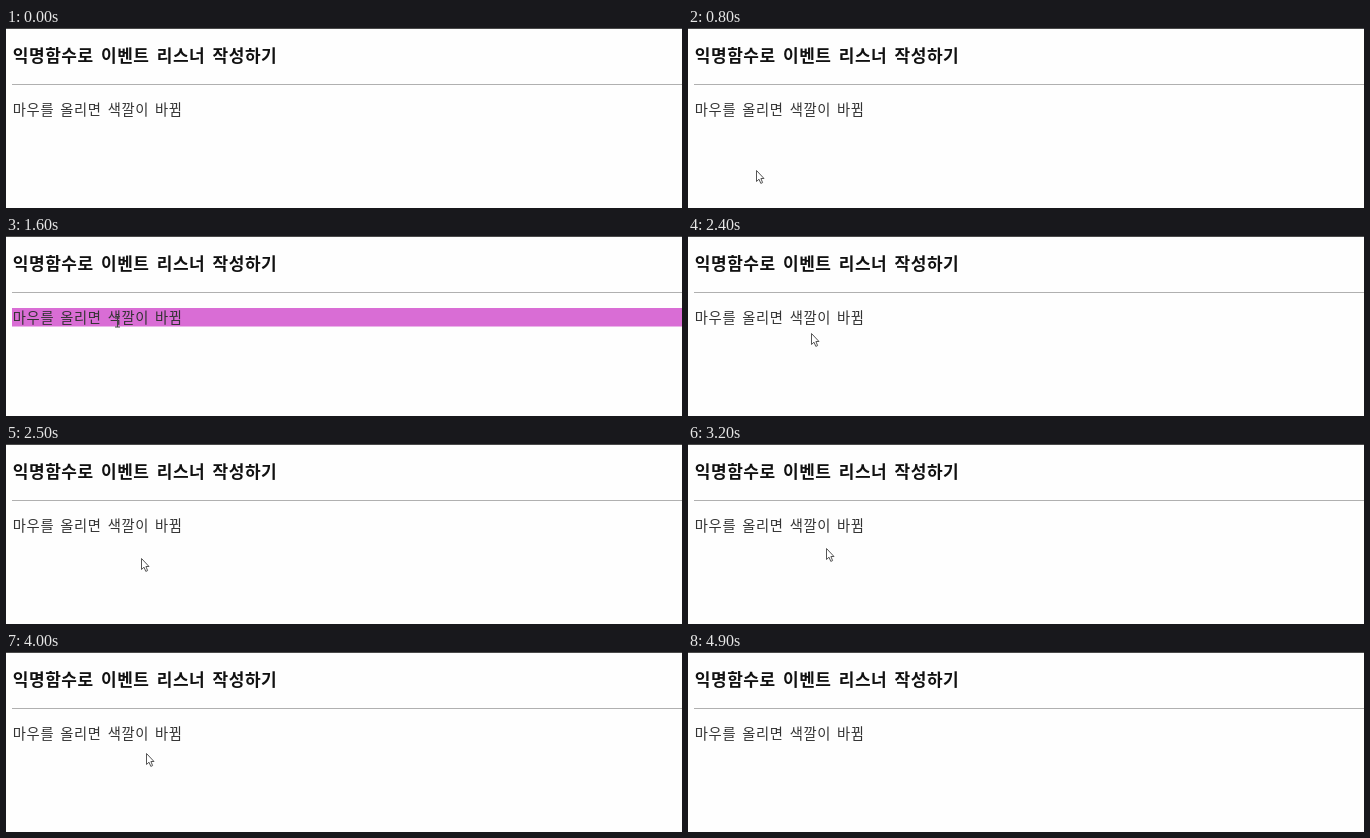
Write an HTML page that moves like this. It is 676 px wide and 180 px high and loops after 5 s.

```html
<!DOCTYPE html>
<html lang="ko">
<head>
<meta charset="utf-8">
<style>
html, body { margin: 0; width: 100%; height: 100%; overflow: hidden; background: #fefefe; }
svg { display: block; }
text { font-family: "Noto Sans CJK KR", "Noto Sans CJK", sans-serif; }
.title { font-size: 17px; font-weight: 700; letter-spacing: .55px; word-spacing: 1.9px; fill: #111; }
.body { font-size: 14.3px; letter-spacing: .64px; word-spacing: 1.4px; fill: #333; }
</style>
</head>
<body>
<svg width="676" height="180" viewBox="0 0 676 180">
  <rect width="676" height="1" fill="#4a4a4a"/>
  <text class="title" x="6.8" y="34.3">익명함수로 이벤트 리스너 작성하기</text>
  <rect x="6" y="56" width="670" height="1" fill="#b0b0b0"/>
  <rect id="bar" x="6" y="72" width="670" height="18.5" fill="#d96dd5"/>
  <text class="body" x="6.8" y="86.7">마우를 올리면 색깔이 바뀜</text>
  <path id="arrow" d="M.5 .5V11.5L3 9.2L4.8 13.4L6.6 12.6L4.9 8.5H8Z" fill="#fff" stroke="#555"/>
  <path id="beam" d="M-2.5 .5H2.5M-2.5 11H2.5M0 .5V11" fill="none" stroke="#444"/>
</svg>
<script>
const LOOP = 5000, STEP = 100, SHOW = 100, HIDE = 4900, BAR_EDGE = 91;
const [bar, arrow, beam] = ["bar", "arrow", "beam"].map(id => document.getElementById(id));

// each move glides from the last place to x, y and then rests
const moves = [
  { from: 100, to: 800, x: 68, y: 142 },
  { from: 1100, to: 1600, x: 111, y: 80 },
  { from: 2300, to: 2500, x: 135, y: 114 },
  { from: 2500, to: 2800, x: 139, y: 126 },
  { from: 2900, to: 3400, x: 137, y: 90 },
  { from: 3700, to: 4000, x: 140, y: 101 },
  { from: 4000, to: 4300, x: 156, y: 136 },
  { from: 4300, to: 4500, x: 191, y: 148 },
  { from: 4700, to: 4800, x: 203, y: 160 }
];

function locate(t) {
  let x = 0, y = 136;
  for (const m of moves) {
    const k = Math.min(1, Math.max(0, (t - m.from) / (m.to - m.from)));
    x += (m.x - x) * k;
    y += (m.y - y) * k;
  }
  return [Math.round(x), Math.round(y)];
}

const show = (el, on) => el.setAttribute("visibility", on ? "visible" : "hidden");

function draw(now) {
  const t = Math.floor(now % LOOP / STEP) * STEP;
  const visible = t >= SHOW && t < HIDE;
  const [x, y] = locate(t);
  const hover = y <= BAR_EDGE;
  show(bar, hover);
  show(beam, hover);
  show(arrow, visible && !hover);
  arrow.setAttribute("transform", `translate(${x} ${y})`);
  beam.setAttribute("transform", `translate(${x + .5} ${y})`);
}

let start;
function tick(now) {
  start ??= now;
  draw(now - start);
  requestAnimationFrame(tick);
}
draw(0);
requestAnimationFrame(tick);
</script>
</body>
</html>
```
